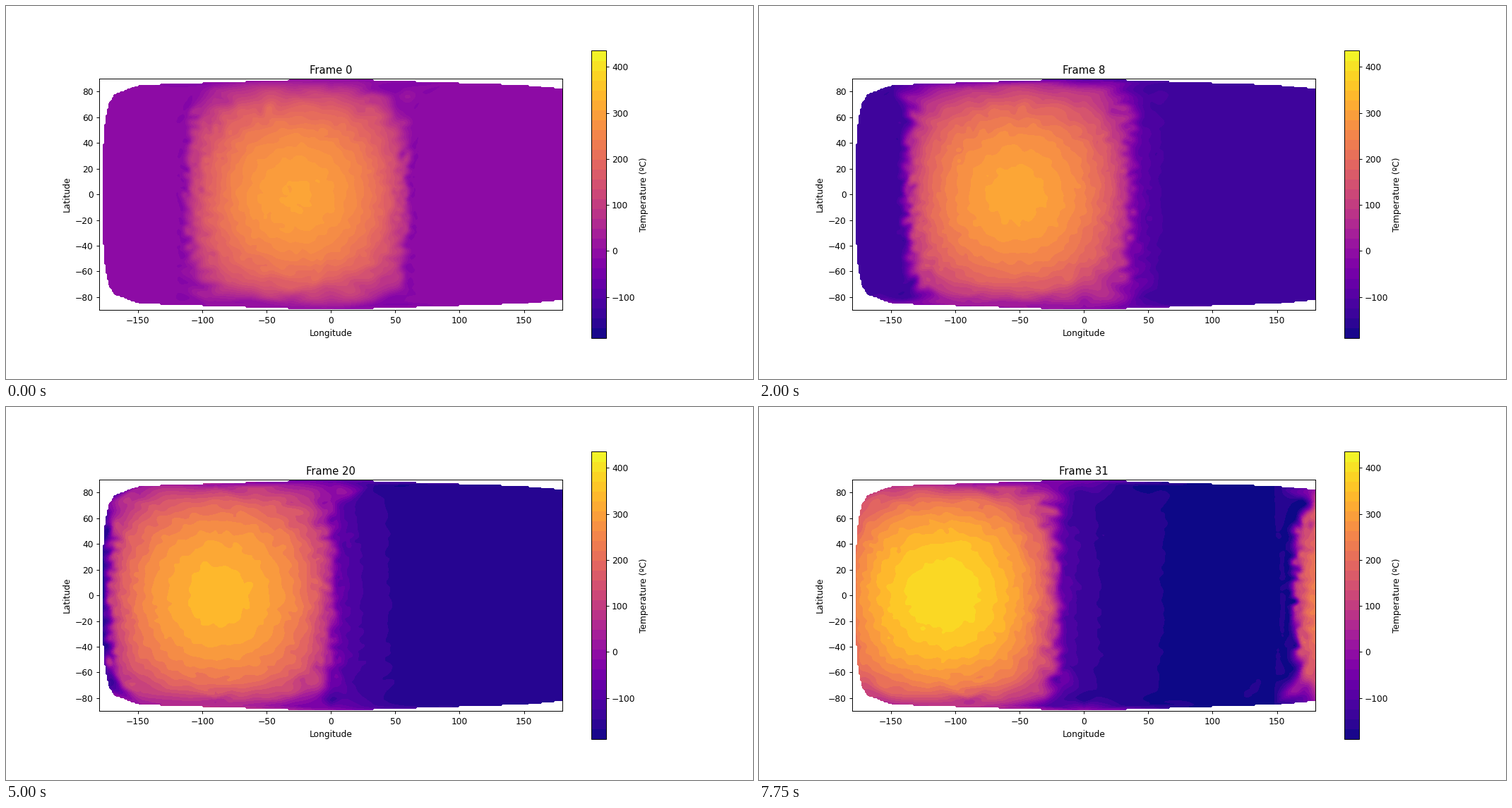
Recreate the animation shown at these times as a matplotlib script. Size 1058 by 529 pixels, loop 8000 ms.

```python
from itertools import combinations

import matplotlib.pyplot as plt
import numpy as np
from matplotlib.animation import FuncAnimation
from matplotlib.cm import ScalarMappable
from matplotlib.colors import BoundaryNorm, ListedColormap
from matplotlib.ticker import MaxNLocator
from matplotlib.tri import Triangulation

FRAMES, INTERVAL, SUBSTEPS = 32, 250, 20
T_MIN, T_MAX = -189.2, 435
BAR_BANDS = 29
KELVIN = 273.15
NIGHT_START = 260.0      # kelvin
RADIATION = 1.1e-8       # change per frame of T for a unit of T**4


def subdivide(points, faces):
    """Split every spherical triangle into four."""
    sides = np.sort(faces[:, [[0, 1], [1, 2], [2, 0]]], axis=2).reshape(-1, 2)
    edges, inverse = np.unique(sides, axis=0, return_inverse=True)
    mids = points[edges].sum(axis=1)
    mids /= np.linalg.norm(mids, axis=1, keepdims=True)
    a, b, c = faces.T
    ab, bc, ca = (len(points) + inverse.reshape(-1, 3)).T
    parts = [(a, ab, ca), (b, bc, ab), (c, ca, bc), (ab, bc, ca)]
    return np.vstack([points, mids]), np.vstack([np.column_stack(p) for p in parts])


def icosphere(depth):
    phi = (1 + 5 ** 0.5) / 2
    corners = np.array([np.roll((0, s, t * phi), k)
                        for k in range(3) for s in (-1, 1) for t in (-1, 1)])
    near = np.linalg.norm(corners[:, None] - corners[None], axis=2) < 2.1
    faces = np.array([f for f in combinations(range(12), 3)
                      if all(near[i, j] for i, j in combinations(f, 2))])
    points = corners / np.linalg.norm(corners, axis=1, keepdims=True)
    for _ in range(depth):
        points, faces = subdivide(points, faces)
    return points


class CubicSurface:
    """Smooth cubic interpolation of scattered values on fixed sample positions."""

    def __init__(self, nodes, x, y):
        self.nodes = nodes
        tri = Triangulation(*nodes.T)
        found = tri.get_trifinder()(x, y)
        self.inside = found >= 0
        self.verts = tri.triangles[found[self.inside]]

        a, b, c = (nodes[self.verts[:, k]] for k in range(3))
        p = np.column_stack([x[self.inside], y[self.inside]])
        u, v, w = b - a, c - a, p - a
        area = u[:, 0] * v[:, 1] - u[:, 1] * v[:, 0]
        lb = (w[:, 0] * v[:, 1] - w[:, 1] * v[:, 0]) / area
        lc = (u[:, 0] * w[:, 1] - u[:, 1] * w[:, 0]) / area
        self.bary = np.array([1 - lb - lc, lb, lc])

        self.src, self.dst = np.vstack([tri.edges, tri.edges[:, ::-1]]).T
        self.edge = nodes[self.dst] - nodes[self.src]
        self.weighted = self.edge / np.linalg.norm(self.edge, axis=1)[:, None] ** 3
        q = np.zeros((len(nodes), 2, 2))
        np.add.at(q, self.src, 4 * self.weighted[:, :, None] * self.edge[:, None, :])
        self.q_inv = np.linalg.inv(q)

    def gradients(self, values):
        """Slopes that minimise the bending along the edges."""
        rise = 6 * (values[self.dst] - values[self.src])
        grad = np.zeros_like(self.nodes)
        for _ in range(15):
            pull = rise - 2 * (self.edge * grad[self.dst]).sum(axis=1)
            rhs = [np.bincount(self.src, pull * self.weighted[:, k], len(values))
                   for k in range(2)]
            grad = np.einsum('nij,jn->ni', self.q_inv, np.array(rhs))
        return grad

    def __call__(self, values):
        grad = self.gradients(values)
        f = values[self.verts].T
        total = (f * self.bary ** 3).sum(axis=0)
        centre = -f.sum(axis=0) / 6
        for i in range(3):
            start = self.verts[:, i]
            for j in {0, 1, 2} - {i}:
                step = self.nodes[self.verts[:, j]] - self.nodes[start]
                control = f[i] + (step * grad[start]).sum(axis=1) / 3
                total += 3 * self.bary[i] ** 2 * self.bary[j] * control
                centre += control / 4
        total += 6 * self.bary.prod(axis=0) * centre
        out = np.full(self.inside.shape, np.nan)
        out[self.inside] = total
        return out


def star_longitude(n):
    return -26 - 3.6 * n + 0.02 * n ** 2 + 0.0003 * n ** 3


def peak_temperature(n):
    return 575.8 + 0.966 * n + 0.00211 * n ** 3


def temperature_history(points):
    """Heating by the star against T**4 cooling; degrees Celsius per frame."""
    rng = np.random.default_rng(4)
    texture = 1 + 0.012 * rng.standard_normal(len(points))
    normals = points + 0.025 * rng.standard_normal(points.shape)
    normals /= np.linalg.norm(normals, axis=1, keepdims=True)

    def heating(n):
        lon = np.radians(star_longitude(n))
        sun = normals @ np.array([np.cos(lon), np.sin(lon), 0])
        return peak_temperature(n) ** 4 * sun.clip(0) * texture

    temp = np.maximum(heating(0) ** 0.25, NIGHT_START)
    for n in range(FRAMES):
        yield temp - KELVIN
        for k in range(1, SUBSTEPS + 1):
            gain = heating(n + k / SUBSTEPS) - temp ** 4
            temp = temp + RADIATION / SUBSTEPS * gain


def contour_levels(nodal, field):
    """Round steps chosen from the range of the frame."""
    step = np.diff(MaxNLocator(24).tick_values(nodal.min(), nodal.max()))[0]
    return np.arange(np.floor(field.min() / step),
                     np.ceil(field.max() / step) + 1) * step


points = icosphere(4)
px, py, pz = points.T.round(12) + 0.0
nodes = np.degrees(np.column_stack([np.arctan2(py, px), np.arcsin(pz)])).round(9)

lons = np.linspace(-180, 180, 360)
lats = np.linspace(-90, 90, 180)
grid_x, grid_y = np.meshgrid(lons, lats)
surface = CubicSurface(nodes, grid_x.ravel() * (1 - 1e-9), grid_y.ravel())

maps = []
for nodal in temperature_history(points):
    field = np.ma.masked_invalid(surface(nodal).reshape(grid_x.shape))
    maps.append((field, contour_levels(nodal, field)))

fig, ax = plt.subplots(figsize=(12, 6), dpi=1058 / 12)


def draw_map(n):
    field, levels = maps[n]
    return ax.contourf(lons, lats, field, levels=levels, cmap='plasma',
                       vmin=T_MIN, vmax=T_MAX)


bar_colors = plt.get_cmap('plasma')((np.arange(BAR_BANDS) + 0.5) / BAR_BANDS)
bar_norm = BoundaryNorm(np.linspace(T_MIN, T_MAX, BAR_BANDS + 1), BAR_BANDS)
bar = fig.colorbar(ScalarMappable(bar_norm, ListedColormap(bar_colors)), ax=ax,
                   label='Temperature (ºC)', ticks=range(-100, 401, 100))
bar.minorticks_off()

current = draw_map(0)
ax.set(xlabel='Longitude', ylabel='Latitude', aspect='equal',
       xlim=(-180, 180), ylim=(-90, 90))


def update(n):
    global current
    current.remove()
    current = draw_map(n)
    ax.set_title(f'Frame {n}')
    return [current]


anim = FuncAnimation(fig, update, frames=FRAMES, interval=INTERVAL,
                     repeat=True, repeat_delay=0)
plt.show()
```
